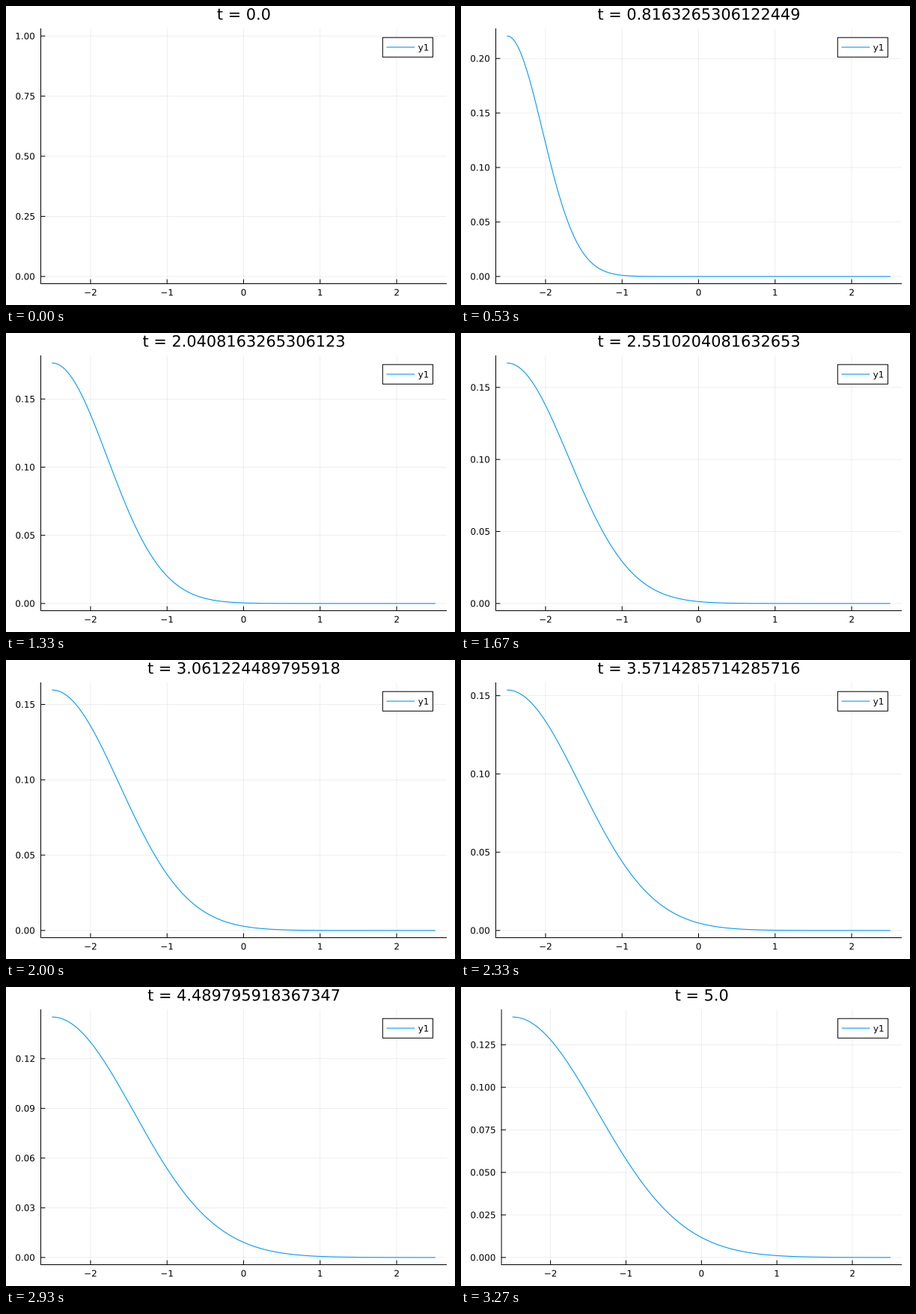
Animation of 600x400 px, one loop 3340 ms. Source, as a matplotlib script:

```python
import numpy as np
import matplotlib.pyplot as plt
from matplotlib.animation import FuncAnimation
from matplotlib.patches import PathPatch, Rectangle
from matplotlib.textpath import TextPath
from matplotlib.transforms import Affine2D

plt.rcParams["font.family"] = "DejaVu Sans"
plt.rcParams["path.snap"] = False

WIDTH, HEIGHT, DPI = 600, 400, 100
LOOP_MS, TICK_MS = 3340, 10
STATES, RATE = 50, 15  # pictures per loop, pictures per second
T_END, X_START, X_END = 5, -2.5, 2.5
TOP, BOTTOM, RIGHT = 30.5, 371.5, 588.5
PAD = 0.03  # margin on each side of the data, as a share of its range
SMALL, LARGE = 11.91, 20.85
DIGIT = 0.636 * SMALL
BLUE = "#009afa"
STEPS = [(1, 1.0), (5, 0.9), (2, 0.7), (2.5, 0.5), (3, 0.2)]

fig = plt.figure(figsize=(WIDTH / DPI, HEIGHT / DPI), dpi=DPI, facecolor="white")
ax = fig.add_axes([0, 0, 1, 1])
ax.set_xlim(0, WIDTH)
ax.set_ylim(HEIGHT, 0)
ax.axis("off")

xs = np.linspace(X_START, X_END, 500)
shown = {"state": None}


def line(x, y, color="black", width=1.0, z=2, **kw):
    ax.plot(x, y, color=color, lw=width * 72 / DPI, zorder=z, **kw)


def label(text, x, y, size=SMALL, align=0.5):
    """Place text with its digits centred on y; align 0 left, 0.5 centre, 1 right."""
    path = TextPath((0, 0), text, size=size)
    box = path.get_extents()
    shift = x - box.x0 - align * box.width
    flip = Affine2D().scale(1, -1).translate(shift, y + 0.3645 * size)
    ax.add_patch(PathPatch(flip.transform_path(path), fc="black", lw=0, zorder=6))


def nice_step(peak):
    """Pick the tick step by tick count, coverage and roundness."""
    span, top = peak * (1 + 2 * PAD), peak * (1 + PAD)
    best = None
    for power in (-3, -2, -1, 0):
        for q, nice in STEPS:
            step = float(f"{q}e{power}")
            n = int(top / step + 1e-9) + 1
            if 4 <= n <= 8:
                score = (0.25 * (1 - abs(n - 5) / 5)
                         + 0.5 * span / ((n - 1) * step) + 0.25 * nice)
                rank = (round(score, 9), -n, step)
                best = max(best, rank) if best else rank
    return best[2], -best[1]


def pulse(t):
    """A spreading bell centred on the left end."""
    spread = t + 0.03
    return 0.2116 * spread ** -0.25 * np.exp(-2 * (xs - X_START) ** 2 / spread)


def draw_legend(left):
    right = RIGHT - (RIGHT - left) / 30
    x, y, w, h = right - 67.1, 42.2, 67.1, 26.1
    ax.add_patch(Rectangle((x, y), w, h, fc="white", ec="black",
                           lw=72 / DPI, zorder=4))
    line([x + 5.7, x + 42.3], [55.1, 55.1], BLUE, 1.1, z=5)
    label("y1", x + 47.7, 55.3, align=0)


def draw_state(k):
    for artist in [*ax.lines, *ax.patches]:
        artist.remove()

    t = T_END * k / (STATES - 1)
    ys = pulse(t) if k else None  # nothing is defined at t = 0
    peak = ys[0] if k else 1.0

    step, count = nice_step(peak)
    decimals = len(f"{step:g}".split(".")[1])
    left = 46.5 + DIGIT * (decimals - 2)
    x_scale = (RIGHT - left) / ((X_END - X_START) * (1 + 2 * PAD))
    y_scale = (BOTTOM - TOP) / (peak * (1 + 2 * PAD))
    middle = (left + RIGHT) / 2
    zero = BOTTOM - PAD * peak * y_scale

    for value in range(-2, 3):
        x = middle + value * x_scale
        line([x, x], [TOP, BOTTOM], width=0.65, z=0, alpha=0.1)
        line([x, x], [BOTTOM, BOTTOM - 5.4], z=3)
        label(str(value).replace("-", "\u2212"), x, 383.1)
    for i in range(count):
        y = zero - i * step * y_scale
        line([left, RIGHT], [y, y], width=0.65, z=0, alpha=0.1)
        line([left, left + 5.4], [y, y], z=3)
        label(f"{i * step:.{decimals}f}", left - 8.5, y, align=1)

    line([left, left, RIGHT], [TOP, BOTTOM, BOTTOM], z=3)
    if k:
        line(middle + xs * x_scale, zero - ys * y_scale, BLUE, 1.1)
    draw_legend(left)
    label(f"t = {t}", middle, 10.7, LARGE)


def draw(frame):
    # Each picture starts on the 10 ms tick nearest to its ideal time.
    ms = frame * TICK_MS + TICK_MS / 2
    k = min(int(ms * RATE / 1000), STATES - 1)
    if k != shown["state"]:
        draw_state(k)
        shown["state"] = k
    return [*ax.lines, *ax.patches]


anim = FuncAnimation(fig, draw, frames=LOOP_MS // TICK_MS,
                     init_func=lambda: draw(0), interval=TICK_MS,
                     repeat=True, repeat_delay=0)
plt.show()
```
